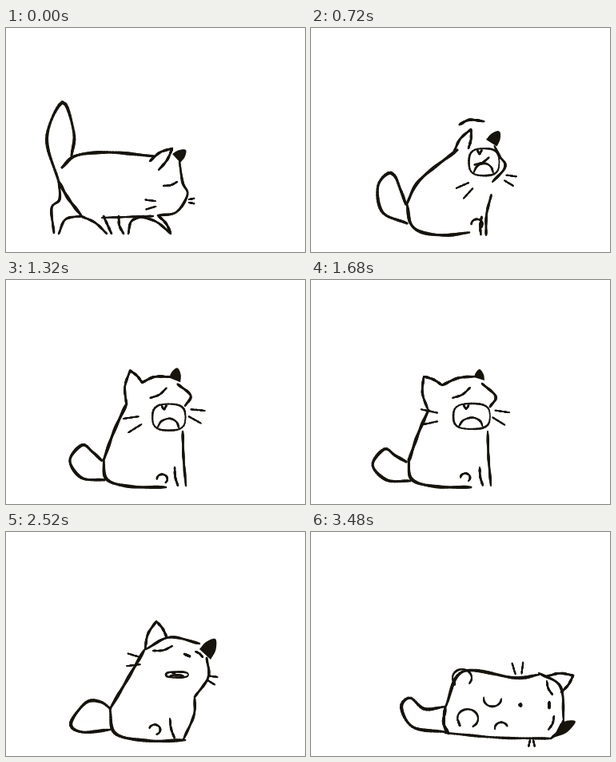
These frames come from a looping animation (374 by 281 pixels, 3.54 s). An HTML page with a canvas:

```html
<!DOCTYPE html>
<html lang="en">
<head>
<meta charset="utf-8">
<title>Cat</title>
<style>
html, body { margin: 0; width: 100%; height: 100%; overflow: hidden; background: #fff; }
canvas { display: block; width: 374px; height: 281px; }
</style>
</head>
<body>
<canvas id="stage" width="374" height="281"></canvas>
<script>
const LOOP = 3540, STEP = 60, N = 36, INK = '#17140c', RAD = Math.PI / 180;
const PIVOT = [220, 215];
const ctx = document.getElementById('stage').getContext('2d');

const lerp = (a, b, u) => a + (b - a) * u;
const mix = (p, q, u) => [lerp(p[0], q[0], u), lerp(p[1], q[1], u)];
const polar = (x, y, r, a, ry = r) => [x + r * Math.cos(a), y + ry * Math.sin(a)];
const noise = n => { const s = Math.sin(n * 127.1) * 43758.5453; return s - Math.floor(s); };
const pairs = v => v.flatMap((x, i) => i % 2 ? [] : [[x, v[i + 1]]]);

function spin([x, y], angle) {
  const c = Math.cos(angle), s = Math.sin(angle), dx = x - PIVOT[0], dy = y - PIVOT[1];
  return [PIVOT[0] + dx * c - dy * s, PIVOT[1] + dx * s + dy * c];
}

// Smooth curve through the points, resampled to N even steps.
function trace(pts) {
  const last = pts.length - 1;
  const at = i => i < 0 ? mix(pts[1], pts[0], 2) : i > last ? mix(pts[last - 1], pts[last], 2) : pts[i];
  const fine = [pts[0]], dist = [0];
  for (let i = 0; i < last; i++) {
    const [a, b, c, d] = [at(i - 1), at(i), at(i + 1), at(i + 2)];
    for (let k = 1; k <= 12; k++) {
      const u = k / 12;
      const p = [0, 1].map(j => b[j] + u / 2 * (c[j] - a[j] +
        u * (2 * a[j] - 5 * b[j] + 4 * c[j] - d[j] + u * (3 * (b[j] - c[j]) + d[j] - a[j]))));
      const q = fine[fine.length - 1];
      dist.push(dist[dist.length - 1] + Math.hypot(p[0] - q[0], p[1] - q[1]));
      fine.push(p);
    }
  }
  const out = [];
  for (let n = 0, k = 0; n < N; n++) {
    const want = dist[dist.length - 1] * n / (N - 1);
    while (k < fine.length - 2 && dist[k + 1] < want) k++;
    out.push(mix(fine[k], fine[k + 1], (want - dist[k]) / (dist[k + 1] - dist[k] || 1)));
  }
  return out;
}

// Drawing rules: each turns a few key values into a list of lines.
const bend = (a, b, k) => {
  const [x, y] = mix(a, b, .5);
  return [a, [x + (b[1] - a[1]) * k, y - (b[0] - a[0]) * k], b];
};
const curve = v => [pairs(v)];
const bowed = k => v => [bend(...pairs(v), k)];
const ear = v => {
  const [a, tip, b] = pairs(v);
  return [bend(a, tip, .1), bend(tip, b, .07)];
};
const leaf = v => {
  const [a, tip, b] = pairs(v);
  return [[...bend(a, tip, .13), ...bend(tip, b, .13).slice(1)]];
};
const whiskers = ([x, y, deg, len]) => [-1, 1].map(s => {
  const mid = polar(x, y, s * len * .36, (deg + 90) * RAD), a = (deg + s * 12) * RAD;
  return [polar(...mid, -len / 2, a), polar(...mid, len / 2, a)];
});
const hook = sweep => ([x, y, r, deg]) =>
  [Array.from({ length: 9 }, (_, k) => polar(x, y, r, (deg + sweep * k / 8) * RAD, r * .9))];
const pad = v => {
  const [x, y, r] = v;
  return [...hook(250)(v), [[x - r * .95, y + r * .15], [x - r * .75, y + r * .7]]];
};
const mouth = ([x, y, w, h]) => {
  const round = c => Math.sign(c) * Math.abs(c) ** .7;
  const lips = Array.from({ length: 17 }, (_, k) => k * Math.PI / 8)
    .map(a => [x + w * round(Math.cos(a)), y + h * round(Math.sin(a))]);
  const tongue = [[-.7, .8], [-.45, .3], [.05, .1], [.45, .35], [.6, .8]];
  const fang = [[-.45, -.9], [-.3, -.6], [-.15, -.9]];
  return [lips, ...[tongue, fang].map(l => l.map(([i, j]) => [x + w * i, y + h * j]))];
};
const stride = v => v.map(([hip, foot, k]) => bend([hip, 236], [foot, 258], k));

// Part: line width (0 = filled) and rule.
const parts = {
  back: [3.7, curve], tail: [3.6, curve], belly: [3.7, curve], chest: [3, curve],
  ear: [2.9, ear], crown: [3.1, curve], dark: [0, leaf], face: [3, curve],
  eye: [2.4, bowed(-.1)], farEye: [2.4, bowed(.1)], nose: [2.8, bowed(0)],
  mouth: [2.3, mouth], cheek: [2, whiskers], muzzle: [2, whiskers],
  paw: [2.4, hook(230)], leg: [2.6, bowed(-.06)], shin: [2.4, bowed(-.06)],
  pad1: [2.4, pad], pad2: [2.4, pad], hand1: [2.3, hook(190)], hand2: [2.3, hook(170)],
  hind: [3, curve], under: [2.6, bowed(0)], stride: [2.8, stride]
};

const walk = {
  back: [70, 175, 88, 160, 130, 156, 186, 161],
  tail: [66, 193, 51, 138, 71, 93, 85, 132, 82, 160],
  belly: [66, 193, 78, 214, 94, 235],
  chest: [190, 235, 200, 245, 206, 257],
  ear: [180, 167, 208, 151, 191, 178],
  dark: [208, 158, 225, 153, 218, 169],
  face: [217, 168, 221, 194, 227, 209, 213, 231, 190, 235],
  eye: [197, 198, 214, 193],
  cheek: [181, 221, 176, 13], muzzle: [232, 217, 0, 7],
  hind: [66, 193, 67, 215, 57, 226, 60, 257],
  under: [120, 238, 184, 236],
  stride: [[94, 66, -.25], [94, 126, .08], [122, 132, 0], [141, 147, -.1], [172, 153, -.25], [165, 206, .1]]
};
const crouch = {
  back: [117, 217, 140, 184, 212, 157],
  tail: [118, 240, 84, 216, 86, 172, 107, 156, 113, 192, 117, 217],
  belly: [118, 217, 130, 252, 165, 260, 196, 253],
  chest: [230, 229, 217, 243, 213, 261],
  ear: [203, 163, 234, 146, 219, 176],
  dark: [234, 157, 254, 150, 246, 167],
  face: [244, 165, 249, 186, 256, 203, 230, 229],
  eye: [226, 195, 243, 189],
  cheek: [219, 220, 143, 13], muzzle: [259, 212, 28, 9],
  leg: [216, 238, 210, 261], shin: [196, 245, 203, 261]
};
const yawn = {
  back: [122, 225, 136, 187, 154, 149],
  tail: [122, 250, 94, 246, 82, 222, 98, 203, 111, 213, 120, 225],
  belly: [122, 225, 126, 250, 155, 259, 200, 260],
  chest: [221, 190, 222, 222, 225, 258],
  ear: [154, 150, 166, 108, 175, 126],
  crown: [175, 126, 188, 120, 206, 122],
  dark: [204, 123, 217, 109, 219, 130],
  face: [215, 131, 231, 144, 224, 157],
  eye: [183, 148, 202, 136],
  cheek: [167, 185, 145, 21], muzzle: [239, 168, 15, 18],
  mouth: [206, 173, 19, 17],
  paw: [197, 251, 7, 180], leg: [211, 235, 215, 258]
};
const howl = {
  ...yawn,
  back: [122, 228, 134, 193, 147, 163],
  tail: [124, 252, 95, 251, 77, 232, 92, 212, 105, 220, 119, 228],
  ear: [146, 162, 141, 121, 164, 132],
  crown: [164, 132, 184, 123, 205, 121],
  dark: [204, 122, 211, 112, 217, 126],
  face: [214, 130, 231, 146, 224, 159],
  eye: [177, 148, 199, 135],
  cheek: [148, 172, 180, 21], muzzle: [237, 171, 20, 18],
  mouth: [201, 171, 23, 16],
  paw: [193, 248, 6, 180]
};
const doze = {
  back: [130, 222, 150, 188, 173, 148],
  tail: [130, 248, 95, 251, 81, 240, 100, 214, 118, 213, 131, 222],
  belly: [130, 222, 137, 253, 180, 262, 224, 261],
  chest: [236, 207, 235, 230, 222, 260],
  ear: [174, 147, 188, 112, 201, 132],
  crown: [175, 147, 205, 132, 242, 140],
  dark: [242, 147, 262, 134, 256, 160],
  face: [251, 158, 253, 182, 236, 207],
  eye: [184, 149, 208, 143], farEye: [237, 150, 246, 157], nose: [223, 153, 230, 156],
  cheek: [160, 161, 185, 17], muzzle: [258, 185, 20, 11],
  mouth: [214, 179, 14, 3.5],
  paw: [186, 248, 7, 200], leg: [205, 234, 211, 259]
};
const flop = {
  turn: 90,
  back: [165, 215, 195, 169, 250, 178, 285, 177],
  tail: [162, 226, 125, 202, 120, 170, 138, 156, 151, 170, 165, 201],
  belly: [165, 215, 166, 238, 176, 252],
  chest: [300, 259, 235, 258, 168, 252],
  ear: [290, 179, 333, 188, 313, 203],
  crown: [285, 177, 312, 194, 316, 236],
  dark: [313, 238, 330, 249, 304, 258],
  face: [316, 236, 312, 248, 300, 259],
  eye: [295, 187, 302, 204], farEye: [304, 231, 297, 248], nose: [298, 213, 298, 221],
  cheek: [284, 168, 275, 15], muzzle: [287, 263, 75, 7],
  mouth: [265, 219, 1.3, 1.3],
  pad1: [203, 182, 11, 180], pad2: [204, 231, 10, 190],
  hand1: [237, 201, 9, 50], hand2: [238, 246, 9, 180]
};
const roll = {
  ...flop,
  back: [168, 220, 190, 175, 255, 183, 285, 179],
  tail: [170, 251, 128, 245, 113, 220, 124, 208, 142, 222, 168, 219],
  belly: [168, 220, 166, 240, 172, 253],
  ear: [295, 181, 328, 180, 313, 201],
  dark: [312, 240, 331, 238, 303, 258],
  cheek: [259, 171, 265, 15], muzzle: [276, 265, 90, 8],
  mouth: [262, 217, 1.2, 1.2],
  pad1: [189, 183, 12, 150], pad2: [196, 234, 13, 170],
  hand1: [227, 209, 11, 0], hand2: [238, 246, 8, 170]
};
const keys = [[0, walk], [420, crouch], [1020, yawn], [1680, howl], [2520, doze], [3060, flop], [3480, roll]]
  .map(([time, pose]) => ({ time, pose, turn: (pose.turn || 0) * RAD }));

// Sample every part with the body upright, so that turning stays rigid.
for (const key of keys) {
  key.lines = {};
  for (const name in parts) {
    if (!key.pose[name]) continue;
    key.lines[name] = parts[name][1](key.pose[name]).map(l => trace(l).map(p => spin(p, -key.turn)));
  }
  key.spine = key.lines.back[0][N >> 1];
}

// Parts seen in one pose only ride along with the back until halfway.
function blend(name, from, to, u) {
  const a = from.lines[name], b = to.lines[name];
  if (a && b) return a.map((line, i) => line.map((p, k) => mix(p, b[i][k], u)));
  const near = u < .5 ? from : to, now = mix(from.spine, to.spine, u);
  return (near.lines[name] || []).map(line =>
    line.map(p => [p[0] + now[0] - near.spine[0], p[1] + now[1] - near.spine[1]]));
}

function brush(pts, width, seed) {
  const phase = noise(seed) * 6.28;
  for (let k = 1; k < N; k++) {
    const taper = Math.min(1, .7 + Math.min(k, N - k) / 10);
    ctx.lineWidth = width * taper * (1 + .15 * Math.sin(k * .55 + phase));
    ctx.beginPath();
    ctx.moveTo(...pts[k - 1]);
    ctx.lineTo(...pts[k]);
    ctx.stroke();
  }
}

function draw(t) {
  let i = keys.length - 2;
  while (t < keys[i].time) i--;
  const from = keys[i], to = keys[i + 1];
  const raw = Math.min(1, (t - from.time) / (to.time - from.time));
  const u = raw * raw * (3 - 2 * raw), angle = lerp(from.turn, to.turn, u);
  ctx.fillStyle = '#fff';
  ctx.fillRect(0, 0, 374, 281);
  ctx.fillStyle = ctx.strokeStyle = INK;
  ctx.lineCap = 'round';
  Object.entries(parts).forEach(([name, [width]], n) => {
    for (const line of blend(name, from, to, u)) {
      const pts = line.map(p => spin(p, angle));
      if (width) {
        brush(pts, width, n + t / STEP * .37);
      } else {
        ctx.beginPath();
        pts.forEach(p => ctx.lineTo(...p));
        ctx.fill();
      }
    }
  });
}

const start = performance.now();
let shown = -1;
function tick() {
  const t = Math.floor((performance.now() - start) % LOOP / STEP) * STEP;
  if (t !== shown) draw(shown = t);
  requestAnimationFrame(tick);
}
tick();
</script>
</body>
</html>
```
